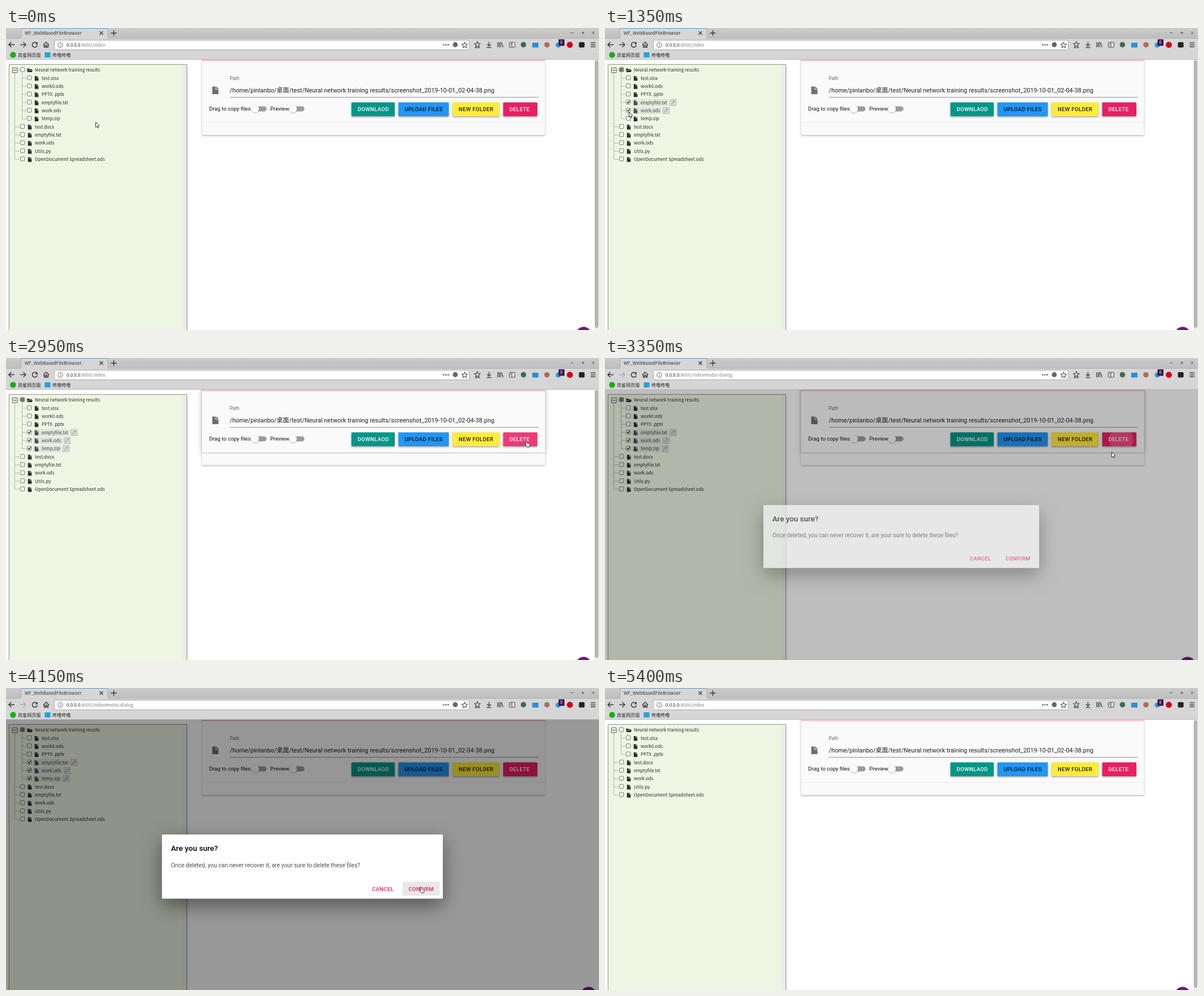
An HTML page with a canvas that plays this animation: 1048 by 534 pixels, repeating every 5.45 s.

```html
<!DOCTYPE html>
<html lang="en">
<head>
<meta charset="utf-8">
<title>File browser</title>
<style>
html, body { margin: 0; height: 100%; overflow: hidden; background: #fff; }
canvas { display: block; }
</style>
</head>
<body>
<canvas id="stage" width="1048" height="534"></canvas>
<script>
const ctx = document.getElementById('stage').getContext('2d');
const LOOP = 5450;
const UI = '"Noto Sans CJK SC", "Noto Sans", sans-serif';
const ROBOTO = 'Roboto, "Noto Sans CJK SC", sans-serif';
const INK = 'rgba(0,0,0,.87)';
const PINK = '#e91e63';

const folderName = 'Neural network training results';
const children = ['test.xlsx', 'work0.ods', 'PPTX .pptx', 'emptyfile.txt', 'work.ods', 'temp.zip'];
const roots = ['test.docx', 'emptyfile.txt', 'work.ods', 'Utils.py', 'OpenDocument Spreadsheet.ods'];
const checkedAt = { 3: 900, 4: 1300, 5: 2350 };

const FILE = 'M-3.2-4.2H1L3.3-1.8V4.2H-3.2Z';
const FOLDER = 'M-4.8-3H-1.5L-.5-2H3.5V-.9H-2.6L-4.8 2.6ZM-2.2-.2H5.4L3.4 3.2H-4.4Z';
const ARROW = 'M0 0V9.2L2.1 7.4 3.6 10.4 5 9.7 3.6 6.8 6.4 6.5Z';
const HAND = 'M1.2 0C2.2-.2 2.6.4 2.7 1.2L3.2 3.2 7 4.2C8.2 4.6 8.3 5.4 8 6.6L7.4 10H3.2L.4 6.6C0 6 .5 5.3 1.3 5.8L1.8 6.1.6 1.2C.4.4.7.1 1.2 0Z';
const LEFT = 'M5 0H-5M-.5-4.5L-5 0-.5 4.5';
const STAR = 'M0-5L1.5-1.7 5-1.4 2.4 1 3.2 4.6 0 2.7-3.2 4.6-2.4 1-5-1.4-1.5-1.7Z';

function box(x, y, w, h, fill, radius = 0, stroke) {
  ctx.beginPath();
  ctx.roundRect(x, y, w, h, radius);
  if (fill) { ctx.fillStyle = fill; ctx.fill(); }
  if (stroke) { ctx.strokeStyle = stroke; ctx.lineWidth = 1; ctx.stroke(); }
}

function disc(x, y, r, fill) {
  ctx.beginPath();
  ctx.arc(x, y, r, 0, 7);
  ctx.fillStyle = fill;
  ctx.fill();
}

function shape(d, x, y, fill, stroke, width = 1) {
  ctx.save();
  ctx.translate(x, y);
  const path = new Path2D(d);
  if (fill) { ctx.fillStyle = fill; ctx.fill(path); }
  if (stroke) { ctx.strokeStyle = stroke; ctx.lineWidth = width; ctx.stroke(path); }
  ctx.restore();
}

function label(str, x, y, size, fill, family = UI, weight = 400, spacing = 0) {
  ctx.font = `${weight} ${size}px ${family}`;
  ctx.letterSpacing = spacing + 'px';
  ctx.fillStyle = fill;
  ctx.fillText(str, x, y);
  return ctx.measureText(str).width;
}

function withShadow(blur, dy, alpha, draw) {
  ctx.save();
  ctx.shadowColor = `rgba(0,0,0,${alpha})`;
  ctx.shadowBlur = blur;
  ctx.shadowOffsetY = dy;
  draw();
  ctx.restore();
}

const caps = (str, x, y, fill) => label(str, x, y, 9.55, fill, ROBOTO, 500, .38);

function drawChrome(hash) {
  const bar = ctx.createLinearGradient(0, 0, 0, 19);
  bar.addColorStop(0, '#cbcbcb');
  bar.addColorStop(1, '#bebebe');
  box(0, 0, 1048, 19, bar);
  box(0, 18, 1048, 38, '#d6d6d6');
  box(0, 18, 1048, 1, '#b3b3b3');
  box(0, 55, 1048, 1, '#b8b8b8');
  box(26, 0, 154, 19, '#d6d6d6');
  box(26, 0, 1, 18, '#adadad');
  box(179.5, 0, 1, 18, '#adadad');
  box(27, 0, 153, 1, '#5c9ad6');
  label('WF_WebBasedFileBrowser', 33, 12.4, 8.1, '#333');
  shape('M-3-3L3 3M3-3L-3 3', 168.5, 9, null, '#333', 1.2);
  shape('M-5 0H5M0-5V5', 190.5, 9, null, '#333', 1.3);
  shape('M-2.5 0H2.5M16.5 0H21.5M19-2.5V2.5M35-2.2L39.4 2.2M39.4-2.2L35 2.2', 1000.5, 8.5, null, '#555');

  shape(LEFT, 10, 29.5, null, '#333', 1.5);
  shape('M-5 0H5M.5-4.5L5 0 .5 4.5', 30, 29.5, null, hash ? '#aaa' : '#444', 1.5);
  shape('M3.8-2.2A4.4 4.4 0 1 0 4.4 1', 50.8, 29.5, null, '#333', 1.5);
  shape('M5-5V-.8H.8Z', 50.8, 29.5, '#333');
  shape('M-5 .5L0-4.5 5 .5M-3.4 0V4.5H-1V1H1V4.5H3.4V0', 71, 29.5, null, '#333', 1.3);

  box(85.5, 21.5, 733, 17, '#fff', 2.5, '#aaa');
  shape('M-4.3 0A4.3 4.3 0 1 0 4.3 0A4.3 4.3 0 1 0-4.3 0M0-.6V2.4M0-2.4V-1.3', 96, 30, null, '#666');
  const w = label('0.0.0.0', 107, 33, 8, '#222');
  label(':8000/index' + (hash ? '#mdui-dialog' : ''), 107 + w, 33, 8, '#808080');
  for (const x of [773.5, 777.5, 781.5]) disc(x, 29.7, 1.3, '#555');
  disc(794, 29.5, 4.4, '#666');
  shape(STAR, 810.5, 30, null, '#555', 1.1);

  shape(STAR, 833, 29, null, '#444', 1.1);
  shape('M-4.5 5.3H4.5', 833, 29.5, null, '#444', 1.1);
  shape('M0-5V2.5M-3.5-1L0 2.5 3.5-1M-4 5H4', 853.5, 29.5, null, '#444', 1.4);
  shape('M-4-4.5V4.5M-1.5-4.5V4.5M1-4.5V4.5M2.5-4L5.5 4.5', 873, 29.5, null, '#444', 1.3);
  box(889.5, 25.5, 10, 8.5, '#e4e4e4', 1, '#444');
  shape('M0-4V4M-3-2H-1.5M-3 0H-1.5', 894, 29.7, null, '#444');
  disc(914.5, 29.5, 4.8, '#3f6b4d');
  box(930, 26, 11, 8.5, '#2b8fd8');
  disc(956, 29.7, 4.8, '#b06d55');
  disc(976, 30, 4.6, '#2a9be0');
  box(976.5, 20, 10.5, 11.5, '#3d1747', 1);
  label('0', 979.6, 28.4, 7, '#fff');
  disc(996.5, 29.7, 5.4, '#d0021b');
  box(1012.5, 25, 10, 9.5, '#222', 2);
  shape('M-4.3-3.5H4.3M-4.3 0H4.3M-4.3 3.5H4.3', 1037.5, 29.7, null, '#444', 1.4);

  disc(12.5, 47.5, 5.2, '#1aad19');
  label('岚雀网页版', 21, 51.2, 8.1, '#222');
  box(68.5, 43, 10, 9, '#1fa3dc');
  label('咚噜咚噜', 82, 51.2, 8.1, '#222');
}

function checkbox(x, y, state) {
  box(x - 3.6, y - 4.3, 7.2, 7.2, state === 'part' ? '#777' : '#f5f8ee', 1, '#777');
  if (state === 'on') shape('M-2-.9L-.4 1 2.8-2.9', x, y, null, '#222', 1.3);
}

function treeItem(name, x, y, state, icon = FILE) {
  checkbox(x - 21.8, y, state);
  const on = state === 'on';
  const ink = on ? '#4a4a4a' : '#2b2b2b';
  ctx.font = `8px ${UI}`;
  ctx.letterSpacing = '0px';
  const w = ctx.measureText(name).width;
  if (on) {
    box(x - 15, y - 6, w + 17, 12, '#e0e4d9');
    box(x + w + 5, y - 5.5, 11, 11, '#dcdcd8', 0, '#b8b8b3');
    shape('M-3 3L-2.4 .9 1.8-3.2 3.2-1.8-1-2.3M-3 3L-.9 2.4 3.2-1.8', x + w + 10.5, y, null, '#999', .9);
  }
  shape(icon, x - 9, y + .5, ink);
  if (icon === FILE) shape('M.7-4.2V-1.4H3.3', x - 9, y + .5, null, '#eef5e1', .7);
  label(name, x, y + 3, 8, ink);
}

function drawTree(t) {
  withShadow(5, 1, .25, () => box(5.5, 64.5, 314, 480, '#eef5e2'));
  box(311, 65, 8, 470, '#ecefe7');
  box(5.5, 64.5, 314, 480, null, 0, '#969892');
  const gone = t >= 4550;
  const kids = gone ? children.slice(0, 3) : children;
  const rowY = i => 74.3 + i * 14.35;
  const branch = [];
  kids.forEach((_, i) => branch.push(`M28.5 ${rowY(i + 1)}H36`));
  roots.forEach((_, i) => branch.push(`M15.5 ${rowY(kids.length + 1 + i)}H24`));
  branch.push(`M21 74.5H25M28.5 79V${rowY(kids.length)}M15.5 79V${rowY(kids.length + roots.length)}`);
  shape(branch.join(''), 0, 0, null, '#b3b8aa');
  box(11.5, 70.5, 8.5, 8.5, '#f8fbf2', 0, '#555');
  shape('M-2.6 0H2.6', 15.8, 74.6, null, '#222');

  treeItem(folderName, 51, rowY(0), t >= 900 && !gone ? 'part' : '', FOLDER);
  kids.forEach((name, i) => treeItem(name, 63, rowY(i + 1), t >= checkedAt[i] ? 'on' : ''));
  roots.forEach((name, i) => treeItem(name, 51, rowY(kids.length + 1 + i), ''));
}

function toggle(x) {
  box(x, 138.6, 20.5, 8.8, '#9c9c9c', 4.4);
  withShadow(2.5, .8, .3, () => disc(x + .5, 143, 6.6, '#fafafa'));
}

function button(str, x, w, fill, ink, ripple) {
  withShadow(3, 1.3, .35, () => box(x, 131.6, w, 24.5, fill, 1.4));
  if (ripple) {
    ctx.save();
    ctx.clip();
    disc(x + w * .56, 144, 21, 'rgba(255,255,255,.2)');
    ctx.restore();
  }
  caps(str, x + 11, 147.2, ink);
}

function drawCard(t) {
  const hover = t >= 2600 && t < 3750;
  withShadow(3, 1.2, .32, () => box(346.3, 50, 606.4, 139.3, '#fafafa', 1.4));
  if (hover) {
    withShadow(9, 3, .22, () => box(346.3, 50, 606.4, 117, '#fafafa'));
    box(346.3, 169, 606.4, 20.3, '#fafafa', 1.4);
  }
  box(346.3, 56, 606.4, 2.7, '#f5c3d2');
  box(346.3, 166.5, 606.4, 1, '#e9e9e9');
  label('Path', 395.5, 92, 8.2, 'rgba(0,0,0,.6)', ROBOTO);
  label('/home/pinlanbo/桌面/test/' + folderName + '/screenshot_2019-10-01_02-04-38.png',
    395.5, 113.7, 10.92, INK, ROBOTO);
  box(395.5, 122, 546.5, 1, 'rgba(0,0,0,.42)');
  shape('M-5.5-6.8H1.5L5.5-2.8V6.8H-5.5Z', 370, 110.3, '#6f6f6f');
  shape('M.7-6V-1.9H4.8', 370, 110.3, null, '#fafafa');

  label('Drag to copy files', 359, 146.2, 9.55, '#111', ROBOTO);
  toggle(440);
  label('Preview', 467, 146.2, 9.55, '#111', ROBOTO);
  toggle(507);
  button('DOWNLAOD', 610.5, 76.5, '#009688', '#fff');
  button('UPLOAD FILES', 693.5, 89, '#2196f3', INK);
  button('NEW FOLDER', 789, 83, '#ffeb3b', INK);
  button('DELETE', 878.7, 60.3, t >= 2950 && t < 3350 ? '#ec3a76' : PINK, '#fff', t >= 3350 && t < 3750);
}

function drawDialog(open, t) {
  box(0, 56, 1048, 478, `rgba(0,0,0,${.4 * open})`);
  const scale = .95 + .05 * open;
  ctx.save();
  ctx.globalAlpha = open;
  ctx.translate(523.75, 315.75);
  ctx.scale(scale, scale);
  ctx.translate(-523.75, -315.75);

  // Keep the shadow outside so it does not show through the fading panel
  ctx.save();
  ctx.beginPath();
  ctx.rect(0, 0, 1048, 600);
  ctx.rect(275.5, 259, 496.5, 113.5);
  ctx.clip('evenodd');
  withShadow(34, 12, .45, () => box(275.5, 259, 496.5, 113.5, '#000', 1.4));
  ctx.restore();

  box(275.5, 259, 496.5, 113.5, '#fff', 1.4);
  label('Are you sure?', 291.5, 288.4, 13.65, '#000', ROBOTO, 500);
  label('Once deleted, you can never recover it, are your sure to delete these files?',
    291.5, 317, 10.35, 'rgba(0,0,0,.7)', ROBOTO);
  if (t >= 4150) box(700.5, 342.5, 66, 24.5, 'rgba(0,0,0,.09)', 1.4);
  caps('CANCEL', 646.8, 358.5, PINK);
  caps('CONFIRM', 711.4, 358.5, PINK);
  ctx.restore();
}

function drawCursor(t) {
  // Pointer travel advances in 50 ms steps
  const glide = (from, to) =>
    Math.max(0, Math.min(1, (Math.floor((t - from) / 50) + 1) / ((to - from) / 50 + 1)));
  const mix = (a, b, p) => a + (b - a) * p;
  const arrow = (x, y) => shape(ARROW, x, y, '#fff', '#222', .9);
  const hand = (x, y) => shape(HAND, x, y, '#fff', '#222', .9);

  if (t < 700) {
    const p = glide(200, 550);
    arrow(mix(158.5, 42.5, p), mix(166.5, 127.5, p));
  } else if (t < 2350) arrow(42.5, mix(t < 750 ? 128.5 : 129.5, 148.5, glide(950, 1250)));
  else if (t < 2600) arrow(42.5, 156);
  else if (t < 2950) arrow(520, 150);
  else if (t < 3350) hand(917.5, 147);
  else if (t < 3750) arrow(895.5, 166.5);
  else if (t < 4150) {
    ctx.save();
    ctx.translate(642, 353.5);
    ctx.rotate(-Math.PI / 2.6);
    hand(0, 0);
    ctx.restore();
  } else if (t < 4550) hand(731, 352);
  else if (t < 5000) arrow(650.5, 244.5);
  else if (t < 5400) arrow(262.5, 240.5);
}

function draw(t) {
  const modal = t >= 3350 && t < 5000;
  box(0, 0, 1048, 534, '#fff');
  drawTree(t);
  drawCard(t);
  if (!modal) {
    box(1039.5, 56, 8.5, 478, '#efefef');
    box(1041.5, 57.5, 4.5, 472, '#b9b9b9', 2.2, '#9b9b9b');
  }
  withShadow(4, 1.5, .25, () => disc(modal ? 1029.5 : 1020.8, 542.2, 13.65, '#6a1b74'));
  if (modal) drawDialog(t < 3750 ? .64 : t < 4550 ? 1 : .01, t);
  drawChrome(t >= 3350 && t < 4550);
  drawCursor(t);
}

function tick() {
  draw(performance.now() % LOOP);
  requestAnimationFrame(tick);
}
tick();
</script>
</body>
</html>
```
